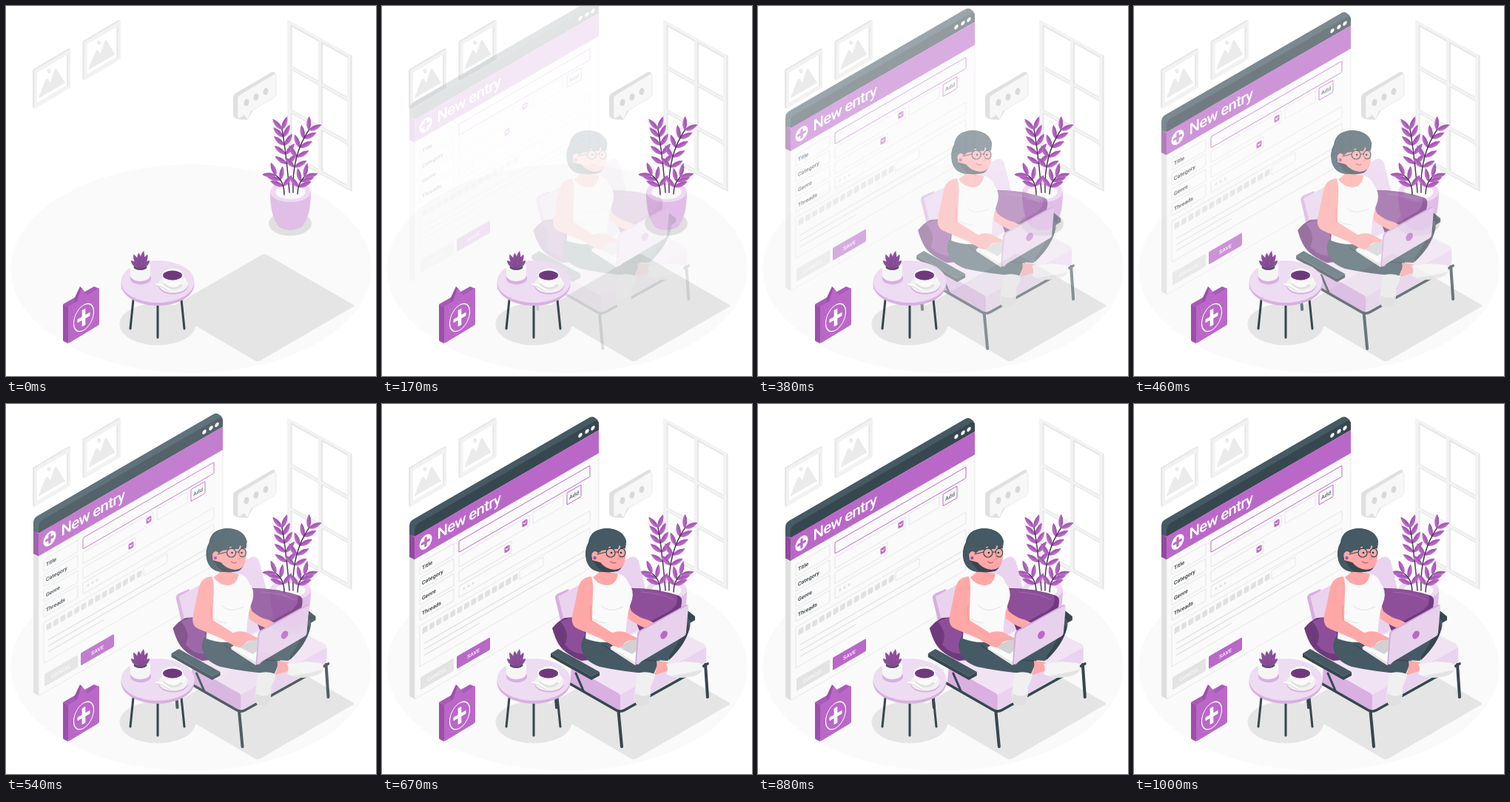
Recreate the animation shown at these times as an HTML page. Size 500x500 px, loop 1.04 s.

```html
<!DOCTYPE html>
<html lang="en">
<head>
<meta charset="utf-8">
<title>New entry</title>
<style>
  html, body { margin: 0; width: 100%; height: 100%; overflow: hidden; background: #fff; }
  svg { display: block; width: 100vw; height: 100vh; }
  text { font-family: Roboto, "Open Sans", sans-serif; font-weight: 500; }
  .field { fill: #fafafa; stroke: #e0e0e0; stroke-width: .8; }
  .lines { fill: none; stroke-linecap: round; stroke-linejoin: round; }
</style>
</head>
<body>
<svg viewBox="0 0 500 500">
  <defs>
    <g id="picture">
      <path fill="#e6e6e6" d="M36 86L85 57L87 58V110L38 139L36 137Z"/>
      <path fill="#f2f2f2" d="M38 87L87 58V110L38 139Z"/>
      <path fill="#fff" d="M42 90L82 66.500V107L42 130.500Z"/>
      <path fill="#e8e8e8" d="M82 66.500L84 66V108L82 107Z"/>
      <path fill="#ebebeb" d="M43.500 125L53 101Q55 96 57 99L60 103L65 88Q67 82 69 86L80 104Z"/>
      <ellipse cx="58" cy="88" rx="2.300" ry="3" fill="#ebebeb"/>
    </g>
    <g id="leaf">
      <path fill="#ba68c8" d="M0 0C4 -6 12 -6 18 -1C13 4 5 5 0 0Z"/>
      <path fill="#a45ab2" d="M0 0C6 -1 12 -1 18 -1C13 4 5 5 0 0Z"/>
    </g>
  </defs>

  <ellipse cx="250" cy="355" rx="243.500" ry="141" fill="#fafafa"/>
  <use href="#picture"/>
  <use href="#picture" x="67.500" y="-38.500"/>

  <g transform="matrix(1 .558 0 1 381 19)" class="lines">
    <path stroke="#e6e6e6" stroke-width="6" stroke-linejoin="miter" d="M2.500 3H83.500V181H2.500ZM44 3V181M3 62H83M3 121H83"/>
    <path stroke="#f3f3f3" stroke-width="3.600" stroke-linejoin="miter" d="M1.800 2H82.500V181H1.800ZM43 3V181M3 62H83M3 121H83"/>
  </g>

  <g>
    <path fill="#e0e0e0" d="M307 123Q307 120 310 118L358 90Q361 88 364 90L326 154L313 153L308 150Q307 149 307 147Z"/>
    <path fill="#f7f7f7" stroke="#e3e3e3" stroke-width=".7" d="M313 126Q313 122 316 120L361 93Q365 91 365 95V119Q365 122 362 124L331 142L326.500 154L322 147.500L315 152Q313 153 313 150Z"/>
    <g fill="#d9d9d9">
      <ellipse cx="325" cy="130.500" rx="3.300" ry="4.800" transform="rotate(16 325 130.500)"/>
      <ellipse cx="338" cy="123" rx="3.300" ry="4.800" transform="rotate(16 338 123)"/>
      <ellipse cx="351" cy="115.500" rx="3.300" ry="4.800" transform="rotate(16 351 115.500)"/>
    </g>
  </g>

  <path fill="#e5e5e5" d="M345 336.500Q349 334 353 336.500L469 403.500Q471 405 469 406.500L344 479Q340 481 336 479L222 412Q219 410 222 408Z"/>
  <ellipse cx="205" cy="430" rx="51.500" ry="28.500" fill="#e5e5e5"/>

  <ellipse cx="384" cy="294" rx="29" ry="16.500" fill="#e0e0e0"/>
  <path fill="#e1bee7" d="M357 251C357 276 362 289 367 296C373 305 395 305 402 296C407 289 412 276 412 251Z"/>
  <ellipse cx="384.500" cy="251" rx="27.500" ry="14" fill="#eedaf2"/>
  <ellipse cx="384.500" cy="251.500" rx="20" ry="9.500" fill="#fafafa"/>
  <g id="plant"></g>

  <g id="panel">
    <path fill="#455a64" d="M37 165Q37 159 42 156L279 19Q283 16 287 18L292 22L48 180L37 177Z"/>
    <path fill="#8f4a9c" d="M37 176L45 180V211L37 207Z"/>
    <path fill="#e0e0e0" d="M37 207L45 211V399L39 396Q37 395 37 392Z"/>
    <g transform="matrix(1 -.577 0 1 44 164)" id="form">
      <path fill="#fafafa" stroke="#e0e0e0" stroke-width=".6" d="M0 46H249V232Q249 235 246 235H3Q0 235 0 232Z"/>
      <path fill="#37474f" d="M0 15V7Q0 0 6 0H243Q249 0 249 6V15Z"/>
      <path fill="#ba68c8" d="M0 15H249V46H0Z"/>
      <g fill="#fff">
        <circle cx="224" cy="7.500" r="2.700"/><circle cx="233" cy="7.500" r="2.700"/><circle cx="241" cy="7.500" r="2.700"/>
        <ellipse cx="15" cy="31" rx="8.500" ry="9.300"/>
        <text x="30.500" y="37" font-size="20.400" letter-spacing="-.7">New entry</text>
      </g>
      <path class="lines" stroke="#ba68c8" stroke-width="3.400" d="M10.500 31H19.500M15 26V36"/>
    </g>
  </g>

  <g id="chair">
    <g class="lines" stroke="#37474f" stroke-width="4">
      <path d="M235 398L236 410M437 352L440 396M319.500 415L324 463"/>
    </g>
    <path fill="#37474f" d="M400 283L413 279L423 287V292L404 303Z"/>
    <path fill="#d8addf" d="M234 262Q234 258 238 256L252 250L280 345L262 350L243 300Z"/>
    <path fill="#ead3ef" d="M238 260L336 207Q343 204 347 213L356 250L385 330L270 350L246 292Z"/>
    <path fill="#f1e3f4" d="M256 356L370 292L435 324Q440 327 436 331L326 392Q322 394 318 392Z"/>
    <path fill="#d9b0e1" d="M256 355L318 390Q322 392 322 395V412Q320 414 316 412L254 377Z"/>
    <path fill="#ead3ef" d="M322 393L438 329V346Q438 349 435 350L328 411Q324 413 322 411Z"/>
    <g class="lines" stroke="#37474f" stroke-width="3.600">
      <path d="M240 370L316 413.500Q322 417 328 413.500L440 351"/>
      <path stroke-width="3" d="M262 364L272 387"/>
    </g>

    <path fill="#6f3a7c" d="M230 303Q238 293 247 289L275 287L290 345L270 347Q247 338 239 325Q234 317 230 303Z"/>
    <path fill="#8d4f9a" d="M241 294Q257 287 268 289L281 337Q260 341 247 325Q255 310 241 294Z"/>
    <path fill="#6f3a7c" d="M326 249Q365 247 401 259Q406 261 405 269Q402 290 396 303L350 312Z"/>
    <path fill="#8d4f9a" d="M328 250Q365 247 398 259Q402 270 390 279L355 298L332 276Z"/>
    <path fill="none" stroke="#a565b2" stroke-width="1" d="M350 254Q380 256 395 265"/>

    <path fill="#455a64" d="M352 326L406 289Q419 287 416 302Q411 323 386 347L371 346L350 354Z"/>
    <path fill="#37474f" d="M388 341Q403 323 407 300Q414 295 415 304Q411 324 388 346Z"/>
    <path fill="#455a64" d="M276 311Q266 322 271 335Q275 348 294 355Q326 362 367 365L375 346L338 326L330 309Z"/>
    <path fill="none" stroke="#37474f" stroke-width="1.500" d="M299 325Q320 345 371 347"/>
    <path fill="#ffa8a7" d="M371 347L386 349L390 359L367 367Q373 357 371 347Z"/>
    <path fill="#f5f5f5" d="M384 351Q398 350 409 348Q420 349 430 350Q435 353 433 360Q427 368 412 369Q398 371 384 365Q388 358 384 351Z"/>
    <path fill="#e3e3e3" d="M392 367Q414 364 433 359Q430 367 412 369Q402 371 392 367Z"/>
    <path fill="#f0f0f0" d="M345 364Q357 360 369 365Q368 374 363 381Q363 394 361 404Q353 411 344 406Q339 399 342 387Z"/>
    <path fill="#e0e0e0" d="M342 391Q354 398 363 391L361 404Q353 411 344 406Q340 400 342 391Z"/>

    <path fill="#ffa8a7" d="M331 262L337 280Q347 289 360 292L374 299L369 307Q348 302 333 290Z"/>
    <path fill="#fafafa" d="M283 231Q294 240 307 238L319 229Q330 232 333 242Q341 251 338 264Q333 278 331 290L329 315Q304 328 275 317Q279 285 272 247Z"/>
    <path fill="none" stroke="#e0e0e0" stroke-width="1" d="M296 272Q306 284 326 274M278 286Q290 295 303 296"/>
    <path fill="#ffa8a7" d="M292 213L308 217L309 228Q315 228 319 230Q316 245 304 245Q291 244 285 234L293 228Z"/>
    <path fill="#f28f8f" d="M297 222Q304 226 309 223V229Q300 228 297 222Z"/>
    <path fill="#ffa8a7" d="M283 233Q268 234 265 249L257 287Q255 300 265 304L298 318Q308 326 321 327L334 326Q342 325 345 320L335 313Q325 307 314 311L284 292Q284 274 285 256Q286 242 283 233Z"/>
    <path fill="none" stroke="#f28f8f" stroke-width="1" d="M282 272Q281 285 283 293M322 316L337 320"/>

    <path fill="#37474f" d="M276 211Q273 198 279 187Q281 170 302 168Q325 168 330 185L328 200Q328 222 318 226Q308 228 300 227Q281 228 276 211Z"/>
    <path fill="#ffa8a7" d="M283 196L327 190Q331 203 328 213Q325 224 314 224Q302 223 295 214L284 211Z"/>
    <path fill="#455a64" d="M280 187Q282 170 303 168Q326 169 330 186L329 195L323 195L321 190L319 196L310 196L308 190L305 197L297 198L292 202Q286 197 283 204Q281 210 287 214Q291 222 299 227Q279 226 276 209Q275 198 280 187Z"/>
    <ellipse cx="288" cy="205" rx="4.500" ry="6" fill="#ffa8a7"/>
    <circle cx="287.500" cy="208" r="2.200" fill="#9c54aa"/>
    <g class="lines" stroke="#37474f" stroke-width="1.200">
      <circle cx="309" cy="201" r="6"/>
      <ellipse cx="324" cy="201" rx="4.800" ry="5.700"/>
      <path d="M315 200H319M303 200L291 203M306 195.500L311 194.500M322 194.500H326"/>
      <path stroke="#c85e69" d="M309 213Q312 216 316 214"/>
      <path stroke="#f28f8f" d="M319 202L321 209L318 210"/>
    </g>
    <circle cx="310" cy="201" r="1.300" fill="#263238"/>
    <circle cx="323" cy="201" r="1.300" fill="#263238"/>

    <path fill="#e6e6e6" d="M308 331L345 310V351L342 353Z"/>
    <path fill="#fafafa" d="M308 329L346 307L374 325L344 350Z"/>
    <path fill="#d2d2d2" d="M319 328L344 315L348 330L338 338Z"/>
    <path fill="#ffa8a7" d="M304 313Q316 305 328 308L344 316Q345 320 338 319Q329 320 325 326Q321 331 317 328Q311 328 304 319Z"/>
    <path fill="#d3a9dc" d="M345 311Q345 308 348 306L411 271L414 272L347 352L342 352Z"/>
    <path fill="#e8d1ed" d="M347 312Q347 309 350 307L411 273Q414 271 414 275L411 309Q411 312 408 314L347 350Q343 353 344 348Z"/>
    <ellipse cx="381" cy="312" rx="4.200" ry="6" fill="#ba68c8" transform="rotate(34 381 312)"/>

    <path fill="#455a64" d="M228 337L238 331L294 362L283 368Z"/>
    <path fill="#37474f" d="M228 337L283 368L294 362V367L283 373L228 342Z"/>
  </g>

  <g id="table">
    <g class="lines" stroke="#37474f" stroke-width="3">
      <path d="M172 397L168 436M205 400V448M237 397L241 436"/>
    </g>
    <ellipse cx="205" cy="376" rx="49.500" ry="29" fill="#d9b0e1"/>
    <ellipse cx="205" cy="372.500" rx="49.500" ry="28.500" fill="#eedcf2"/>
    <ellipse cx="182" cy="368" rx="14" ry="8.500" fill="#d9b0e1"/>
    <path fill="#f5f5f5" d="M168 352H195V364C194 374 170 375 168 364Z"/>
    <ellipse cx="181.500" cy="352" rx="13.500" ry="6" fill="#fff"/>
    <ellipse cx="181.500" cy="353" rx="9" ry="4" fill="#455a64"/>
    <g id="succulent" fill="#8d4f9a"></g>
    <ellipse cx="226" cy="378" rx="20" ry="11.500" fill="#d9b0e1"/>
    <ellipse cx="226" cy="376" rx="20" ry="11.500" fill="#f2f2f2"/>
    <ellipse cx="226" cy="376" rx="13" ry="7" fill="#e0e0e0"/>
    <circle cx="238" cy="371" r="4" fill="none" stroke="#fafafa" stroke-width="2.500"/>
    <path fill="#fafafa" d="M210 364H240Q239 374 232 379Q224 382 217 377Q211 373 210 364Z"/>
    <ellipse cx="225" cy="363" rx="15" ry="8.500" fill="#fff" stroke="#e6e6e6" stroke-width=".7"/>
    <ellipse cx="225" cy="364" rx="13" ry="6.500" fill="#6f3a7c"/>
    <path class="lines" stroke="#fff" stroke-width="2.500" d="M203 376L210 377L220 383"/>
    <path class="lines" stroke="#cfcfcf" stroke-width=".7" d="M202 378L210 379L220 385"/>
  </g>

  <g id="bag">
    <path fill="#9c4fab" d="M77 403L84 407V456L78 453Q77 452 77 451Z"/>
    <path fill="#a95ab8" d="M77 403L119 379L126 382L84 408Z"/>
    <path fill="#9c4fab" d="M92 396L100 379L103 382L110 392L95 401Z"/>
    <path fill="#ba68c8" d="M84 408Q84 406 86 405L96 399L102 381L110 391L124 381.500Q126 380 126 383V429Q126 431 124 432L86 455Q84 456 84 454Z"/>
    <g transform="matrix(1 -.577 0 1 105 421)" class="lines" stroke="#fff">
      <ellipse rx="13.500" ry="17" stroke-width="1.200"/>
      <path stroke-width="4.600" stroke-linecap="butt" d="M-8.500 0H8.500M0 -11V11"/>
    </g>
  </g>
</svg>

<script>
const $ = id => document.getElementById(id);
const add = (id, markup) => $(id).insertAdjacentHTML("beforeend", markup);
const box = (x, y, w, h, attrs = 'class="field"') =>
  `<rect x="${x}" y="${y}" width="${w}" height="${h}" rx="1.500" ${attrs}/>`;
const label = (x, y, size, fill, words, anchor = "start") =>
  `<text x="${x}" y="${y}" font-size="${size}" fill="${fill}" text-anchor="${anchor}">${words}</text>`;

function buildForm() {
  const purple = "#ba68c8";
  const outlined = `fill="#fafafa" stroke="${purple}" stroke-width="1"`;
  const chevron = (x, y) => box(x - 3.5, y - 4, 7, 8, `fill="${purple}"`) +
    `<path class="lines" stroke="#fff" d="M${x - 1.8} ${y - 1}l1.800 2l1.800 -2"/>`;
  let out = "";
  ["Title", "Category", "Genre", "Threads"].forEach((word, i) => {
    const y = 55 + i * 20.5;
    out += box(7, y, 46, 16) + label(10, y + 11, 7.1, "#263238", word);
  });
  out += box(60, 56, 177, 15, outlined);
  out += box(60, 76, 95, 15) + chevron(149, 83);
  out += box(160, 75, 41, 15);
  out += box(206, 75, 19, 16, outlined) + label(215.5, 86, 7.2, "#455a64", "Add", "middle");
  out += box(60, 96.5, 71, 15) + chevron(125, 104);
  out += box(60, 117, 177, 15);
  for (let i = 0; i < 3; i++) out += `<circle cx="${67 + i * 6}" cy="124" r="1.600" fill="#e0e0e0"/>`;
  out += box(7, 140, 230, 55);
  for (let i = 0; i < 14; i++) out += box(10.5 + i * 9.4, 145, 7, 8, 'fill="#e0e0e0"');
  out += box(142, 143, 32, 12);
  out += '<path stroke="#e0e0e0" stroke-width="1.300" d="M13 167H230M13 175H230M13 183H88"/>';
  out += box(8, 210, 45, 17, 'fill="#e3e3e3"') + label(30.5, 221.5, 7, "#fafafa", "CANCEL", "middle");
  out += box(57, 210, 45, 17, `fill="${purple}"`) + label(79.5, 221.5, 7, "#fff", "SAVE", "middle");
  add("form", out);
}

// A curved stem with pairs of leaves that close up towards the tip.
function stem([x0, y0], [x1, y1], [x2, y2], pairs, from) {
  let leaves = "";
  for (let i = 0; i < pairs; i++) {
    const t = from + (1 - from) * i / (pairs - 1), u = 1 - t;
    const x = u * u * x0 + 2 * u * t * x1 + t * t * x2;
    const y = u * u * y0 + 2 * u * t * y1 + t * t * y2;
    const dx = u * (x1 - x0) + t * (x2 - x1), dy = u * (y1 - y0) + t * (y2 - y1);
    const angle = Math.atan2(dy, dx) * 180 / Math.PI, spread = 62 - 32 * t;
    for (const side of [-1, 1]) {
      leaves += `<use href="#leaf" transform="translate(${x} ${y}) rotate(${angle + side * spread}) scale(1.050 ${-side * 0.75})"/>`;
    }
  }
  add("plant", leaves +
    `<path class="lines" stroke="#4d2b56" stroke-width="1.400" d="M${x0} ${y0}Q${x1} ${y1} ${x2} ${y2}"/>`);
}

function buildPlants() {
  stem([383, 252], [379, 200], [373, 167], 5, 0.4);
  stem([388, 252], [386, 202], [409, 168], 5, 0.36);
  stem([376, 255], [376, 237], [365, 229], 3, 0.35);
  stem([394, 254], [394, 240], [403, 231], 3, 0.35);
  let out = "";
  for (const [angle, size] of [[-46, 17], [46, 17], [-24, 22], [26, 22], [-6, 22], [10, 25]]) {
    out += `<path transform="translate(181.500 356) rotate(${angle})" stroke="#6f3a7c" stroke-width=".4" d="M0 0C-3 ${-size * .4} -4 ${-size * .7} 0 ${-size}C4 ${-size * .7} 3 ${-size * .4} 0 0Z"/>`;
  }
  add("succulent", out);
}

const LOOP = 1040, STEP = 1000 / 24, STEPS = 25, FIRST_VISIBLE = 3, SHIFT = 30;

const bezier = (a, b, s) => 3 * a * s * (1 - s) ** 2 + 3 * b * s * s * (1 - s) + s ** 3;

// Ease with a slight overshoot: cubic-bezier(.36, -.01, .5, 1.38).
function ease(x) {
  let low = 0, high = 1;
  for (let i = 0; i < 30; i++) {
    const mid = (low + high) / 2;
    if (bezier(0.36, 0.5, mid) < x) low = mid; else high = mid;
  }
  return bezier(-0.01, 1.38, high);
}

function render(time) {
  const ms = Math.floor(time % LOOP / 10) * 10;
  const step = Math.floor((ms + 4.99) / STEP);
  const progress = ease((step + 1) / STEPS);
  const offset = -SHIFT * (1 - progress);
  const opacity = step < FIRST_VISIBLE ? 0 : Math.min(1, Math.max(0, progress));
  $("panel").setAttribute("transform", `translate(0 ${offset})`);
  $("chair").setAttribute("transform", `translate(${offset} 0)`);
  $("panel").setAttribute("opacity", opacity);
  $("chair").setAttribute("opacity", opacity);
}

buildForm();
buildPlants();
const start = performance.now();
function tick() {
  render(performance.now() - start);
  requestAnimationFrame(tick);
}
tick();
</script>
</body>
</html>
```
